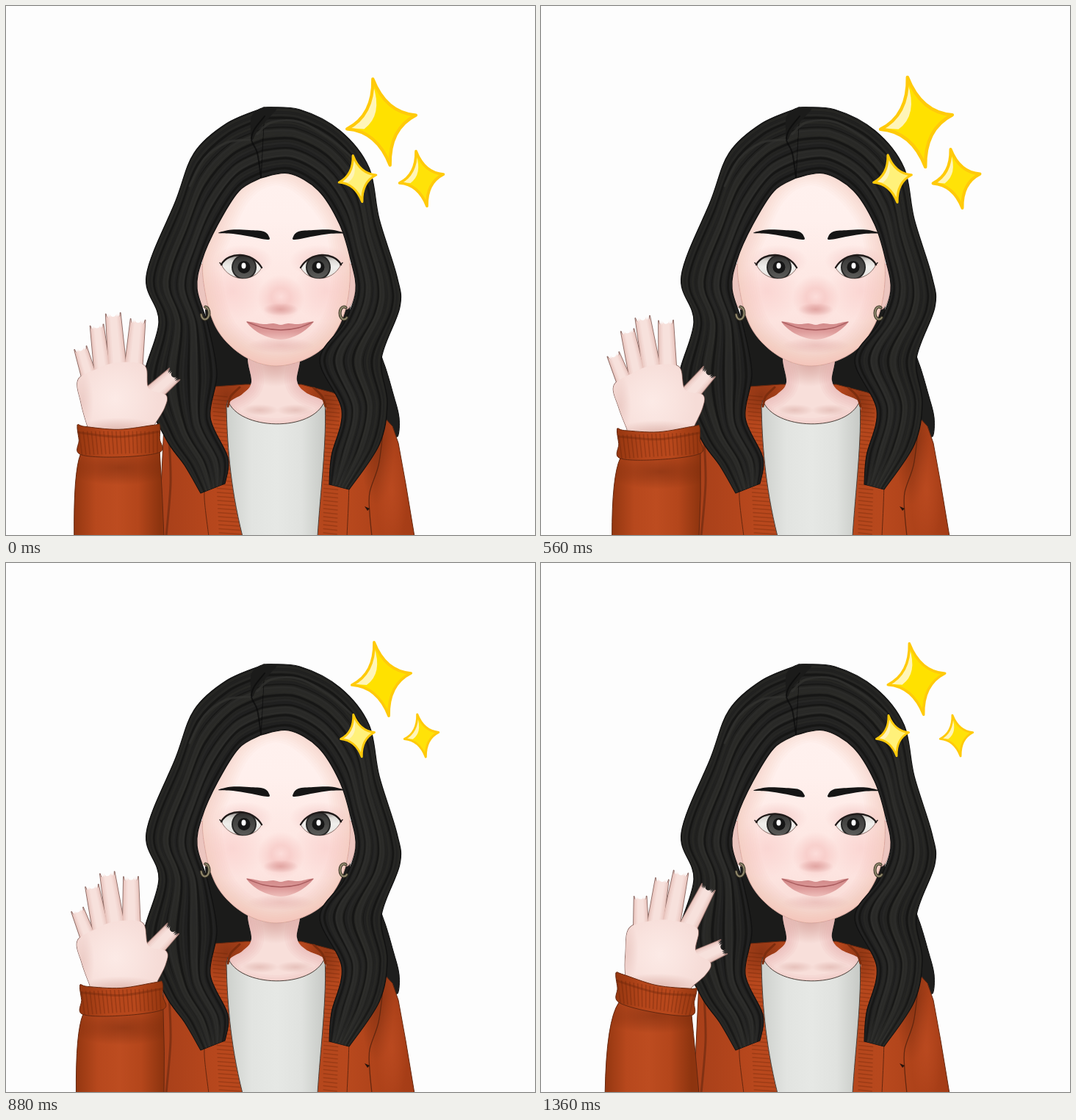
Animation, 720 px wide and 720 px high, one loop 1.44 s. Source, as an HTML page with a canvas:

```html
<!DOCTYPE html>
<html lang="en">
<head>
<meta charset="utf-8">
<title>Waving hello</title>
<style>
  html, body { margin: 0; width: 100%; height: 100%; overflow: hidden; background: #fdfdfd; }
  canvas { display: block; width: 100vw; height: 100vh; object-fit: contain; }
</style>
</head>
<body>
<canvas id="stage" width="720" height="720"></canvas>
<script>
const ctx = document.getElementById('stage').getContext('2d');
const STEP = 80, STEPS = 18, TAU = Math.PI * 2;

const lerp = (a, b, k) => a + (b - a) * k;
const mix = (a, b, k) => a.map((v, i) => lerp(v, b[i], k));
// Point at a distance and clockwise angle (degrees, 0 is up) from another point.
const polar = ([x, y], angle, d) => {
  const r = angle * Math.PI / 180;
  return [x + Math.sin(r) * d, y - Math.cos(r) * d];
};

// Smooth line through flat x, y pairs; an existing path is continued.
function spline(a, closed = true, path) {
  const p = path || new Path2D(), n = a.length / 2;
  const at = i => {
    const k = closed ? (i + n) % n : Math.max(0, Math.min(n - 1, i));
    return [a[2 * k], a[2 * k + 1]];
  };
  if (path) p.lineTo(a[0], a[1]);
  else p.moveTo(a[0], a[1]);
  for (let i = 0; i < (closed ? n : n - 1); i++) {
    const [p0, p1, p2, p3] = [at(i - 1), at(i), at(i + 1), at(i + 2)];
    p.bezierCurveTo(p1[0] + (p2[0] - p0[0]) / 6, p1[1] + (p2[1] - p0[1]) / 6,
      p2[0] - (p3[0] - p1[0]) / 6, p2[1] - (p3[1] - p1[1]) / 6, p2[0], p2[1]);
  }
  if (closed) p.closePath();
  return p;
}

const line = a => spline(a, false);

function polygon(a) {
  const p = new Path2D();
  for (let i = 0; i < a.length; i += 2) p.lineTo(a[i], a[i + 1]);
  p.closePath();
  return p;
}

function ellipse(x, y, rx, ry = rx, turn = 0) {
  const p = new Path2D();
  p.ellipse(x, y, rx, ry, turn, 0, TAU);
  return p;
}

function stroke(path, color, width = 1) {
  ctx.strokeStyle = color;
  ctx.lineWidth = width;
  ctx.stroke(path);
}

function paint(path, fill, outline, width = 1) {
  ctx.fillStyle = fill;
  ctx.fill(path);
  if (outline) stroke(path, outline, width);
}

function linear(x1, y1, x2, y2, ...colors) {
  const g = ctx.createLinearGradient(x1, y1, x2, y2);
  colors.forEach((c, i) => g.addColorStop(i / (colors.length - 1), c));
  return g;
}

// Soft elliptical spot; rgb is "r,g,b".
function blob(x, y, rx, ry, rgb, alpha) {
  ctx.save();
  ctx.translate(x, y);
  ctx.scale(rx, ry);
  const g = ctx.createRadialGradient(0, 0, 0, 0, 0, 1);
  g.addColorStop(0, `rgba(${rgb},${alpha})`);
  g.addColorStop(0.5, `rgba(${rgb},${alpha * 0.55})`);
  g.addColorStop(1, `rgba(${rgb},0)`);
  ctx.fillStyle = g;
  ctx.fillRect(-1, -1, 2, 2);
  ctx.restore();
}

function clipped(path, draw) {
  ctx.save();
  ctx.clip(path);
  draw();
  ctx.restore();
}

// Darkens a shape softly towards its edge.
function rim(path, rgb, alpha, depth) {
  clipped(path, () => {
    for (let w = 4; w <= depth; w += 6) stroke(path, `rgba(${rgb},${alpha})`, w);
  });
}

// ---- Body ----
const SEAM = '#64270f';

function drawBackHair() {
  paint(polygon([270, 400, 470, 400, 452, 540, 280, 540]), '#1b1b1a');
  paint(spline([505, 470, 515, 488, 527, 528, 535, 560, 533, 586, 522, 574, 506, 556, 490, 500]), '#1e1e1d', '#0d0d0d');
}

function ribs(x, lean) {
  for (let y = 530; y < 720; y += 5.5)
    stroke(line([x + (y - 530) * lean, y, x + 20 + (y - 530) * lean * 2, y + 2]), 'rgba(95,32,8,.3)', 1.6);
}

function drawBody() {
  const jacket = polygon([284, 518, 326, 515, 402, 515, 444, 526, 512, 557, 526, 572, 534, 595,
    544, 650, 556, 722, 208, 722, 215, 570]);
  paint(jacket, linear(210, 0, 555, 0, '#a8401a', '#b9481d', '#b4461c', '#b7481d', '#a43c16'), SEAM);
  clipped(jacket, () => {
    blob(300, 530, 40, 40, '90,30,8', 0.45);
    blob(434, 535, 30, 40, '90,30,8', 0.4);
    blob(505, 590, 24, 90, '80,28,8', 0.4);
    blob(525, 660, 22, 75, '200,82,38', 0.5);
    stroke(line([513, 580, 507, 625, 495, 662, 495, 690, 498, 722]), SEAM, 1.3);
    stroke(line([222, 590, 224, 650, 218, 722]), 'rgba(90,35,12,.5)', 3);
  });
  ribs(281, 0.05);
  ribs(434, -0.01);
  stroke(line([272, 640, 270, 670, 276, 722]), SEAM);
  stroke(line([467, 650, 466, 680, 464, 722]), SEAM);
  paint(polygon([488, 681, 495, 684, 492, 687]), '#26140d');

  const neck = spline([333, 470, 334, 512, 322, 528, 304, 541, 312, 566, 368, 578, 425, 564, 434, 540,
    408, 526, 396, 510, 396, 470]);
  paint(neck, '#f8dfda');
  rim(neck, '205,145,137', 0.07, 36);
  clipped(neck, () => {
    blob(366, 484, 46, 34, '196,130,122', 0.6);
    blob(345, 550, 26, 8, '205,150,142', 0.4);
    blob(394, 550, 26, 8, '205,150,142', 0.4);
  });

  const shirt = new Path2D();
  shirt.moveTo(302, 537);
  shirt.bezierCurveTo(316, 578, 418, 581, 434, 537);
  shirt.bezierCurveTo(437, 590, 428, 660, 424, 722);
  shirt.lineTo(322, 722);
  shirt.bezierCurveTo(304, 650, 301, 590, 300, 545);
  shirt.closePath();
  paint(shirt, linear(300, 0, 436, 0, '#cdd0cc', '#e2e4e1', '#e6e8e5', '#e0e2df', '#c5c8c4'), '#4b403a');
  stroke(line([318, 519, 306, 531, 302, 545]), '#7c2d0e', 3);
  stroke(line([419, 520, 430, 531, 435, 545]), '#7c2d0e', 3);
}

// ---- Face ----
const FACE = spline([347, 222, 388, 222, 430, 252, 460, 300, 468, 350, 466, 395, 455, 432, 432, 465,
  402, 483, 368, 490, 336, 483, 307, 464, 285, 436, 272, 395, 268, 345, 285, 300, 310, 250]);

function drawEye(x, y, flip, shut) {
  ctx.save();
  ctx.translate(x, y);
  ctx.scale(flip, 1);
  blob(2, -8, 40, 22, '224,140,138', 0.28 + shut * 0.25);
  const outer = lerp(-3, 4, shut), inner = lerp(1, 7, shut);
  const top = lerp(-21, 14, shut), bottom = lerp(21, 14, shut);
  const lid = new Path2D(), eye = new Path2D();
  for (const p of [lid, eye]) {
    p.moveTo(-28, outer);
    p.bezierCurveTo(-18, top, 14, top, 27, inner);
  }
  eye.bezierCurveTo(17, bottom, -16, bottom + 1, -28, outer);
  if (shut < 1) {
    paint(eye, linear(0, -16, 0, 16, '#cdc8c4', '#f0efec', '#e6e3e0'), '#80625c', 0.9);
    clipped(eye, () => {
      paint(ellipse(3, 0.5, 17), '#262625');
      paint(ellipse(3, 0.5, 15), linear(0, -14, 0, 16, '#3a3a39', '#484846', '#5c5c5a'));
      paint(ellipse(3, 0.5, 8.5), '#161616');
      paint(ellipse(2.5, -1.5, 3, 4), '#fff');
      blob(0, -16, 32, 9, '30,25,25', 0.4);
    });
  }
  stroke(lid, '#201a19', 2.4);
  stroke(line([-27, outer + 0.5, -30, outer - 2.5 * (1 - shut)]), '#201a19', 1.5);
  ctx.translate(0, 9 * shut);
  paint(spline([-32, -46, -14, -50.5 + 2 * shut, 10, -50 + 3 * shut, 30, -48 + 4 * shut, 37, -41, 35, -37,
    10, -41.5, -12, -45]), '#151515');
  ctx.restore();
}

function drawFace(shut) {
  for (const side of [-1, 1])
    paint(ellipse(368 + side * 98, 382, 10, 31, side * 0.1), '#ecc5bf', '#b98b84', 0.8);
  paint(FACE, linear(0, 225, 0, 490, '#fff1ee', '#fff0ed', '#fee9e5', '#fde4e0', '#f6d7d1'), '#d0a49e', 0.8);
  rim(FACE, '222,155,149', 0.045, 56);
  clipped(FACE, () => {
    for (const x of [308, 436]) blob(x, 388, 46, 42, '244,176,174', 0.3);
    blob(374, 398, 32, 32, '236,150,148', 0.45);
    blob(374, 413, 24, 9, '196,112,110', 0.45);
    blob(374, 396, 13, 12, '255,232,229', 0.7);
    blob(374, 462, 46, 11, '214,145,140', 0.35);
  });
  drawEye(321, 355, 1, shut);
  drawEye(428, 355, -1, shut);

  paint(spline([328, 430, 350, 433, 364, 432, 374, 434, 384, 432, 398, 433, 418, 430, 400, 446,
    374, 454, 346, 446]), linear(0, 432, 0, 455, '#d28a8a', '#de9c9b', '#f0c2be'));
  stroke(line([328, 430, 350, 438, 374, 441, 398, 438, 418, 430]), '#a95c5e', 1.3);
}

// ---- Hair: each side is a band between an outer and an inner edge ----
const HAIR = [
  [[350, 138, 400, 141, 455, 170, 494, 220, 508, 290, 532, 368, 536, 410, 511, 480, 519, 540, 508, 597, 467, 658],
   [347, 234, 385, 228, 425, 251, 454, 297, 469, 345, 476, 388, 460, 432, 427, 482, 457, 550, 443, 612, 440, 651]],
  [[352, 138, 300, 160, 256, 200, 231, 265, 191, 367, 208, 430, 187, 515, 217, 588, 243, 625, 265, 663],
   [347, 234, 317, 252, 288, 298, 267, 345, 260, 385, 275, 435, 287, 500, 278, 560, 302, 615, 298, 650]]
];

function reversed(a) {
  const out = [];
  for (let i = a.length - 2; i >= 0; i -= 2) out.push(a[i], a[i + 1]);
  return out;
}

function drawLock([outer, inner]) {
  const band = spline(reversed(inner), false, line(outer));
  band.closePath();
  paint(band, '#1e1e1d', '#101010', 1.2);
  clipped(band, () => {
    for (let k = 1; k < 26; k++) {
      const tone = Math.sin(k * 2.4) * 0.5 + 0.5;
      stroke(line(mix(outer, inner, k / 26)), k % 4 ? `rgba(50,50,47,${0.15 + 0.3 * tone})` : 'rgba(10,10,10,.4)', 3);
    }
    for (const k of [0.36, 0.68]) stroke(line(mix(outer, inner, k)), 'rgba(62,62,57,.28)', 10);
  });
}

function drawHair() {
  paint(polygon([338, 147, 352, 138, 362, 140, 358, 226, 347, 234, 338, 230]), '#1a1a19');
  HAIR.forEach(drawLock);
  paint(spline([333, 156, 338, 145, 350, 138, 368, 139, 360, 150, 343, 168, 335, 182]), '#1b1b1a');
  stroke(line([352, 150, 338, 168, 334, 182, 342, 200, 347, 233]), 'rgba(10,10,10,.7)', 2);
  stroke(line([342, 174, 362, 158, 400, 158, 440, 180, 470, 205]), 'rgba(52,52,49,.7)', 3);
  stroke(line([332, 182, 300, 186, 270, 208, 250, 245]), 'rgba(52,52,49,.7)', 3);

  for (const [x, turn] of [[271, 0.3], [460, 2.6]]) {
    const hoop = new Path2D();
    hoop.ellipse(x, 418, 5.5, 8.5, 0, turn - 1.8, turn + 2.6);
    stroke(hoop, '#3b3527', 4);
    stroke(hoop, '#928a6e', 2);
  }
}

// ---- Waving arm ----
// Three waves per loop; the tempo drifts a little at these steps.
const DRIFT = [[0, 0], [3, -0.12], [5, -0.15], [8, -0.02], [11, 0.24], [14, 0.05], [STEPS, 0]];
// Reach from the wrist, resting angle, swing factor and width, little finger to thumb.
const FINGERS = [[117, -15, 1, 17], [139, -1, 1, 18], [152, 8.5, 1, 20], [146, 24, 1.2, 20], [103, 59, 1, 21]];

function drift(step) {
  const i = DRIFT.findIndex(([t]) => t > step);
  const [t0, a] = DRIFT[i - 1], [t1, b] = DRIFT[i];
  const k = (step - t0) / (t1 - t0);
  return lerp(a, b, k * k * (3 - 2 * k));
}

function fingerShape(root, tip, w) {
  const d = Math.hypot(tip[0] - root[0], tip[1] - root[1]);
  const nx = (root[1] - tip[1]) / d, ny = (tip[0] - root[0]) / d;
  const turn = Math.atan2(ny, nx);
  return k => {
    const a = w * k / 2, b = a * 1.22, p = new Path2D();
    p.moveTo(root[0] + nx * b, root[1] + ny * b);
    p.lineTo(tip[0] + nx * a, tip[1] + ny * a);
    p.arc(...tip, a, turn, turn + Math.PI);
    p.lineTo(root[0] - nx * b, root[1] - ny * b);
    p.closePath();
    return p;
  };
}

function drawHand(wrist, swing, topL, topR) {
  const little = polar(wrist, -25 + swing, 77), index = polar(wrist, 29 + swing, 85);
  const ring = polar(wrist, -7 + swing, 82), middle = polar(wrist, 11 + swing, 85);
  const thumb = mix(index, topR, 0.62);
  const heart = mix(mix(little, index, 0.5), wrist, 0.5);
  const roots = [little, ring, middle, index, thumb].map(p => mix(p, heart, 0.2));
  const fingers = FINGERS.map(([reach, rest, factor, w], i) =>
    fingerShape(roots[i], polar(wrist, rest + swing * factor, reach), w));

  const wristL = mix(topL, topR, 0.12), wristR = mix(topL, topR, 0.93);
  const side = mix(little, wristL, 0.5);
  const palm = spline([little[0] - 9, little[1], ...ring, ...middle, index[0] + 9, index[1],
    ...polar(thumb, swing, 20), ...polar(thumb, 75 + swing, 22), ...polar(thumb, 125 + swing, 19),
    ...wristR, wristR[0] - 6, wristR[1] + 14, wristL[0] + 6, wristL[1] + 14, ...wristL, side[0] - 7, side[1]]);

  const outlines = [palm, ...fingers.map(f => f(1))];
  outlines.forEach(p => stroke(p, '#8d6a64', 1.8));
  outlines.forEach(p => paint(p, '#e8c4bd'));
  ['#efd1cb', '#f4dad5', '#f7e1dc'].forEach((tone, i) => fingers.forEach(f => paint(f(0.85 - i * 0.2), tone)));
  paint(palm, '#f6dcd7');
  clipped(palm, () => {
    blob(...heart, 60, 60, '252,234,230', 1);
    blob(side[0] - 6, side[1], 16, 45, '214,165,157', 0.35);
    blob(wrist[0], wrist[1] + 8, 62, 18, '190,125,112', 0.4);
  });
}

function drawArm(step) {
  const phase = TAU * (0.57 + step / 6 + drift(step));
  const c = Math.cos(phase), s = Math.sin(phase);
  const wrist = [169 + 16 * c + 3 * s, 574 + 5 * c - 2 * s];
  const tilt = 11 + 7 * c + 11 * s, swing = 5 * c + 16 * s;
  const topL = polar(wrist, tilt - 90, 56), topR = polar(wrist, tilt + 90, 56);
  const lowL = [topL[0] + 4, topL[1] + 40], lowR = polar(topR, tilt + 180, 37);
  const endL = 92 + 2 * c - 6 * s, endR = 215;

  const sleeve = new Path2D();
  sleeve.moveTo(...lowL);
  sleeve.quadraticCurveTo(lerp(lowL[0], endL, 0.75) - 3, lowL[1] + 24, endL, 722);
  sleeve.lineTo(endR, 722);
  sleeve.quadraticCurveTo(lerp(lowR[0], endR, 0.3) + 2, 665, ...lowR);
  sleeve.closePath();
  paint(sleeve, linear(endL, 0, lowR[0], 0, '#943711', '#b7481d', '#bd4c20', '#b4461b', '#8d340f'), SEAM);
  clipped(sleeve, () => blob((lowL[0] + lowR[0]) / 2, lowL[1] + 18, 75, 24, '96,32,8', 0.4));

  drawHand(wrist, swing, topL, topR);

  const low = mix(lowL, lowR, 0.5);
  const cuff = spline([...topL, topL[0] + 10, topL[1] + 2, wrist[0], wrist[1] + 6, topR[0] - 8, topR[1], ...topR,
    ...mix(topR, lowR, 0.5), ...lowR, low[0], low[1] + 5, ...lowL, ...mix(topL, lowL, 0.5)]);
  paint(cuff, linear(topL[0], 0, topR[0], 0, '#963710', '#b5461b', '#b8481c', '#963710'), SEAM);
  clipped(cuff, () => {
    for (let k = 0.02; k < 1; k += 0.05) {
      const [x, y] = mix(topL, topR, k);
      stroke(line([x, y + 9, ...mix(lowL, lowR, k)]), 'rgba(92,32,8,.3)', 1.7);
    }
    stroke(line([topL[0], topL[1] + 10, wrist[0], wrist[1] + 16, topR[0], topR[1] + 9]), 'rgba(100,35,10,.35)', 3);
  });
}

// ---- Sparkles: quick growth, a swell, then a fast shrink, once per wave ----
const SPARKLES = [
  { x: 511, y: 158, fill: '#ffe100', low: 35, high: 130 },
  { x: 565.5, y: 235, fill: '#ffe208', low: 1, high: 86 },
  { x: 478.5, y: 235, fill: '#fff17a', low: 33, high: 70 }
];
const TIPS = [[-0.1, -0.5], [0.4, -0.08], [0.1, 0.5], [-0.4, 0.08]];

function drawSparkle({ x, y, fill, low, high }, step) {
  const p = (step + 3) % 6 / 6;
  const swell = 1 + 0.07 * Math.sin(TAU * (step - 8.5) / STEPS);
  const size = lerp(low, high * swell, Math.sin(Math.PI * p ** 1.6) ** 0.6);
  const s = Math.max(0.5, size - 3);
  const star = new Path2D();
  star.moveTo(...TIPS[0]);
  TIPS.forEach((a, i) => {
    const b = TIPS[(i + 1) % 4];
    star.quadraticCurveTo((a[0] + b[0]) * 0.18, (a[1] + b[1]) * 0.18, ...b);
  });
  star.closePath();
  ctx.save();
  ctx.translate(x, y);
  ctx.scale(s, s);
  paint(star, fill);
  clipped(star, () => {
    const shine = new Path2D();
    shine.moveTo(-0.1, -0.44);
    shine.quadraticCurveTo(0.02, -0.08, -0.2, 0.08);
    shine.lineTo(-0.36, 0.07);
    shine.lineTo(-0.3, -0.3);
    shine.closePath();
    paint(shine, '#fff5b8');
  });
  stroke(star, '#ffca0a', s > 80 ? 0.036 : 0.05);
  ctx.restore();
}

// ---- Loop ----
// One blink: a quick close, then a slower opening.
const blink = step => Math.max(0, 1 - Math.abs(step - 14) / (step < 14 ? 2 : 3.3));

function draw(step) {
  ctx.fillStyle = '#fdfdfd';
  ctx.fillRect(0, 0, 720, 720);
  drawBackHair();
  drawBody();
  drawFace(blink(step));
  drawHair();
  drawArm(step);
  SPARKLES.forEach(s => drawSparkle(s, step));
}

ctx.lineCap = ctx.lineJoin = 'round';
const start = performance.now();
function tick() {
  draw(Math.floor((performance.now() - start) / STEP) % STEPS);
  requestAnimationFrame(tick);
}
tick();
</script>
</body>
</html>
```
